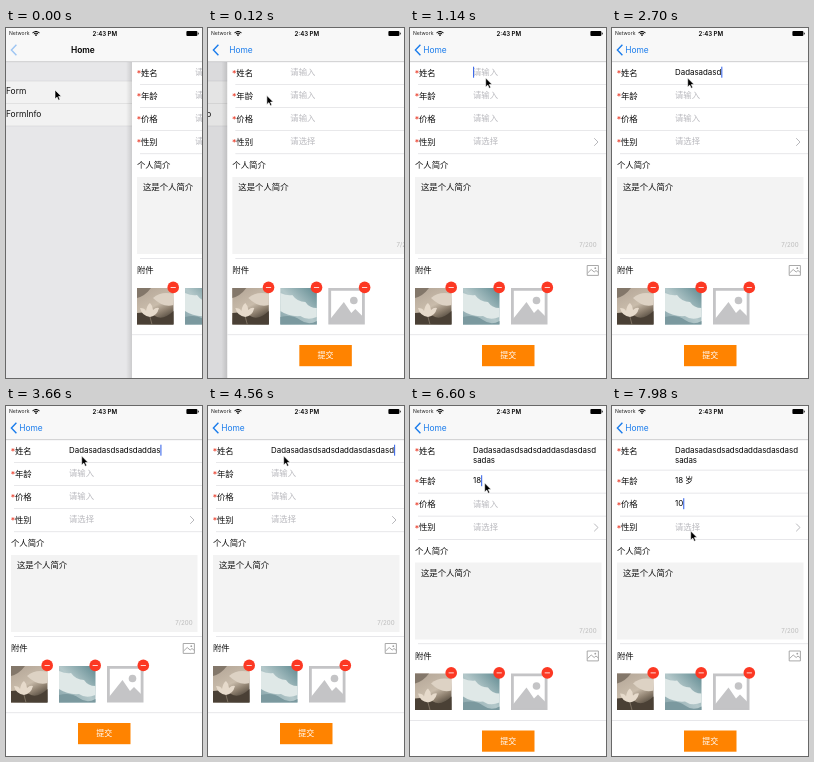
Animation of 196x350 px, one loop 8 s. Source, as an HTML page:

```html
<!DOCTYPE html>
<html lang="zh">
<head>
<meta charset="utf-8">
<title>Form</title>
<style>
html, body { margin: 0; width: 100%; height: 100%; overflow: hidden; background: #fff; }
svg { display: block; width: 100vw; height: 100vh; }
text { font-family: Inter, "Noto Sans CJK SC", "Noto Sans CJK", sans-serif; white-space: pre; }
</style>
</head>
<body>
<svg id="stage" viewBox="0 0 196 350">
  <defs>
    <linearGradient id="edge"><stop offset="0" stop-opacity="0"/><stop offset="1" stop-opacity=".12"/></linearGradient>
    <linearGradient id="dusk" x1=".2" y1="0" x2=".7" y2="1">
      <stop offset="0" stop-color="#b5a798"/><stop offset=".5" stop-color="#c9bcab"/><stop offset=".72" stop-color="#8d7f6e"/><stop offset="1" stop-color="#3b342b"/>
    </linearGradient>
    <linearGradient id="sea" x1="1" y1="0" x2="0" y2="1">
      <stop offset="0" stop-color="#5f8990"/><stop offset=".5" stop-color="#b4c8ca"/><stop offset="1" stop-color="#86a3a9"/>
    </linearGradient>
  </defs>
  <g id="list"></g>
  <rect id="dim" y="34" width="196" height="316"/>
  <g id="form"></g>
  <g id="bar"></g>
  <path id="pointer" d="M0 0V9L2.1 7.1L3.5 10.3L5 9.6L3.6 6.5H6.4Z" fill="#000" stroke="#fff" stroke-width=".6"/>
</svg>
<script>
const NS = 'http://www.w3.org/2000/svg';
const $ = id => document.getElementById(id);
const LOOP = 8000, STEP = 60, CJK = 8.4, LATIN = 7.9;
const NAME = 'Dadasadasdsadsdaddasdasdasdsadas', LINE = 27, WRAP = 7.5;
const BLUE = '#1a7cec', HINT = '#b9b9be', ICON = '#c4c4c6';

function add(parent, tag, attrs) {
  const el = document.createElementNS(NS, tag);
  for (const k in attrs) el.setAttribute(k, attrs[k]);
  return parent.appendChild(el);
}
const rect = (p, x, y, width, height, fill) => add(p, 'rect', { x, y, width, height, fill });
const path = (p, d, fill, stroke = 'none', w = 1) => add(p, 'path', { d, fill, stroke, 'stroke-width': w });
const dot = (p, cx, cy, r, fill) => add(p, 'circle', { cx, cy, r, fill });
function label(p, str, x, cy, size = CJK, fill = '#111', more = {}) {
  const el = add(p, 'text', { x, y: cy + size * .35, 'font-size': size, fill, ...more });
  el.textContent = str;
  return el;
}
const move = (el, x, y) => el.setAttribute('transform', `translate(${x} ${y})`);
const show = (el, on) => el.setAttribute('visibility', on ? 'visible' : 'hidden');

// Page being left
const list = $('list');
rect(list, 0, 34, 260, 316, '#efeff2');
rect(list, 0, 53, 260, 45, '#fbfbfb');
for (const y of [53, 75.5, 98]) rect(list, 0, y - .25, 260, .5, '#d6d6d6');
label(list, 'Form', 21, 63.5, 8.4);
label(list, 'FormInfo', 21, 86.5, 8.4);

// Form page
const form = $('form');
rect(form, -6, 34, 6, 316, 'url(#edge)');
rect(form, 0, 34, 196, 316, '#fff');
const lower = add(form, 'g', {});
const rule = (y, x = 8) => rect(lower, x, y, 196 - x, .6, '#d8d8dc');

function field(p, name, cy, hint) {
  label(p, '*', 4.8, cy + 1, 8.8, '#e8301c');
  label(p, name, 9, cy);
  return {
    hint: label(p, hint, 63, cy - .8, CJK, HINT),
    value: label(p, '', 63, cy - .8, LATIN, '#000'),
    caret: rect(p, 63, cy - 6.3, 1.1, 11, '#3f6bea')
  };
}
const first = field(form, '姓名', 45, '请输入');
const second = label(form, '', 63, 54.3, LATIN, '#000');
const age = field(lower, '年龄', 68, '请输入');
const price = field(lower, '价格', 91, '请输入');
const sex = field(lower, '性别', 114, '请选择');
[56.3, 79.3, 102.3, 125.5, 230].forEach(y => rule(y));
path(lower, 'M184.2 110.2L188 114L184.2 117.8', 'none', '#b8b8bc');

label(lower, '个人简介', 5, 137.2);
rect(lower, 5, 149, 186.5, 77, '#f3f3f3');
label(lower, '这是个人简介', 11, 159.4);
label(lower, '7/200', 186.6, 217, 6.2, '#bcbcbc', { 'text-anchor': 'end' });

label(lower, '附件', 5, 242.2);
path(lower, 'M177.2 237.5H188.4V247.4H177.2ZM177.6 245L181.2 241.5L184.2 244L186 242.5L188.4 244.5', 'none', '#a0a0a0', .9);
dot(lower, 185.3, 240.2, .9, '#a0a0a0');

function thumb(x) {
  const g = add(lower, 'g', {});
  move(g, x, 260);
  return g;
}
const lotus = thumb(5);
rect(lotus, 0, 0, 36.5, 36.5, 'url(#dusk)');
path(lotus, 'M0 0H14Q8 8 0 10Z', '#83776a');
path(lotus, 'M16 10Q24 3 36.5 6V17Q26 20 16 10Z', '#ddd2c4');
path(lotus, 'M0 25Q10 23 18 28T36.5 23V36.5H0Z', '#4a4035');
path(lotus, 'M3 20Q8 20 9 23Q10 17 13 15Q16 18 16 22Q19 19 22 20Q20 28 13 29Q5 28 3 20Z', '#e6dacb');
path(lotus, 'M13 29L15 36.5', 'none', '#8a7d6c', .8);
const surf = thumb(53);
rect(surf, 0, 0, 36.5, 36.5, 'url(#sea)');
path(surf, 'M0 5Q7 8 12 7Q17 14 25 14Q29 20 36.5 20V29Q27 33 20 28Q9 29 0 23Z', '#dfe8e7');
path(surf, 'M0 29Q12 26 20 32T36.5 33V36.5H0Z', '#7b999f');
const blank = thumb(101);
path(blank, 'M1.4 1.4H35.1V35.1H1.4Z', '#fff', ICON, 2.8);
path(blank, 'M2 31L15.5 14L23 25L27 21L35 29V35H2Z', ICON);
dot(blank, 25.5, 12.5, 3.8, ICON);
for (const x of [41.2, 89.2, 137.3]) {
  dot(lower, x, 259.4, 5.8, '#fc3823');
  rect(lower, x - 2.6, 259, 5.2, .8, '#fff');
}
rule(306.5, 0);
rect(lower, 72, 317, 52.5, 21.2, '#ff8300');
label(lower, '提交', 98.2, 327.6, 8, '#fff', { 'text-anchor': 'middle' });

// Status and navigation bars
const bar = $('bar');
rect(bar, 0, 0, 196, 34, '#f8f8f8');
rect(bar, 0, 33.5, 196, .6, '#b4b4b6');
label(bar, 'Network', 3, 5.4, 5.1, '#222');
for (const r of [4.1, 2.5])
  path(bar, `M${30 - r * .85} ${7.8 - r * .75}Q30 ${7.8 - r * 1.45} ${30 + r * .85} ${7.8 - r * .75}`, 'none', '#000', 1);
dot(bar, 30, 7.1, .9, '#000');
label(bar, '2:43 PM', 98.8, 5.5, 6.1, '#000', { 'text-anchor': 'middle', 'font-weight': 600 });
add(bar, 'rect', { x: 180.4, y: 3, width: 11, height: 5, rx: 1, fill: '#000' });
rect(bar, 191.9, 4.7, .8, 1.7, '#000');
const back = path(bar, 'M10.4 16.8L5.4 22L10.4 27.2', 'none', BLUE, 1.4);
const title = label(bar, 'Home', 0, 22.1, 8.4, '#000', { 'text-anchor': 'middle', 'font-weight': 600 });
const link = label(bar, 'Home', 0, 22.1, 8.4, BLUE, { 'text-anchor': 'middle' });

// Keys are [time, value, ...]
const typed = [[1440, 0], [1500, 1], [2280, 9], [2400, 10], [2700, 10], [3180, 15], [3240, 16],
  [3960, 24], [4200, 25], [4560, 27], [4980, 32]];
const route = [[0, 49, 62], [240, 68.7, 73], [600, 75.7, 50], [5040, 75.7, 50], [5400, 74.7, 77],
  [6600, 74.7, 77], [6720, 74.7, 92], [7620, 74.7, 92], [7980, 78.7, 125]];

function sample(keys, t, i = 1) {
  if (t <= keys[0][0]) return keys[0][i];
  const n = keys.findIndex(k => k[0] > t);
  if (n < 0) return keys[keys.length - 1][i];
  const a = keys[n - 1], b = keys[n];
  return a[i] + (b[i] - a[i]) * (t - a[0]) / (b[0] - a[0]);
}
const clamp = v => Math.max(0, Math.min(1, v));

function fill(f, str, focused, end = f.value) {
  f.value.textContent = str;
  show(f.hint, !str);
  show(f.caret, focused);
  f.caret.setAttribute('x', 63 + (end.textContent ? end.getComputedTextLength() : 0));
}

function draw(t) {
  let x = 126 * Math.exp(-t / 64);
  if (x < .2) x = 0;
  const p = 1 - x / 196;
  move(form, x, 0);
  move(list, -58.8 * p, 0);
  $('dim').setAttribute('opacity', .1 * p);
  const cx = 98 - 73 * clamp(p * .81 + Math.max(0, p - .36) * .297);
  const tint = clamp((p - .36) / .45);
  for (const el of [title, link]) el.setAttribute('x', cx);
  title.setAttribute('opacity', 1 - tint);
  link.setAttribute('opacity', tint);
  back.setAttribute('opacity', clamp(p * 1.15));

  const n = Math.floor(sample(typed, t) + 1e-6);
  const wrapped = n > LINE;
  second.textContent = NAME.slice(LINE, n);
  move(lower, 0, wrapped ? WRAP : 0);
  fill(first, NAME.slice(0, Math.min(n, LINE)), t >= 1140 && t < 5460, wrapped ? second : first.value);
  first.caret.setAttribute('y', wrapped ? 48.6 : 38.7);
  const years = t < 5760 ? '' : t < 6000 ? '1' : '18';
  fill(age, t < 6900 ? years : '18 岁', t >= 5460 && t < 6660);
  fill(price, t < 7500 ? '' : t < 7620 ? '1' : '10', t >= 6900);
  fill(sex, '', false);
  move($('pointer'), sample(route, t, 1), sample(route, t, 2));
}

function tick() {
  const t = performance.now() % LOOP;
  draw(t - t % STEP);
  requestAnimationFrame(tick);
}
tick();
</script>
</body>
</html>
```
